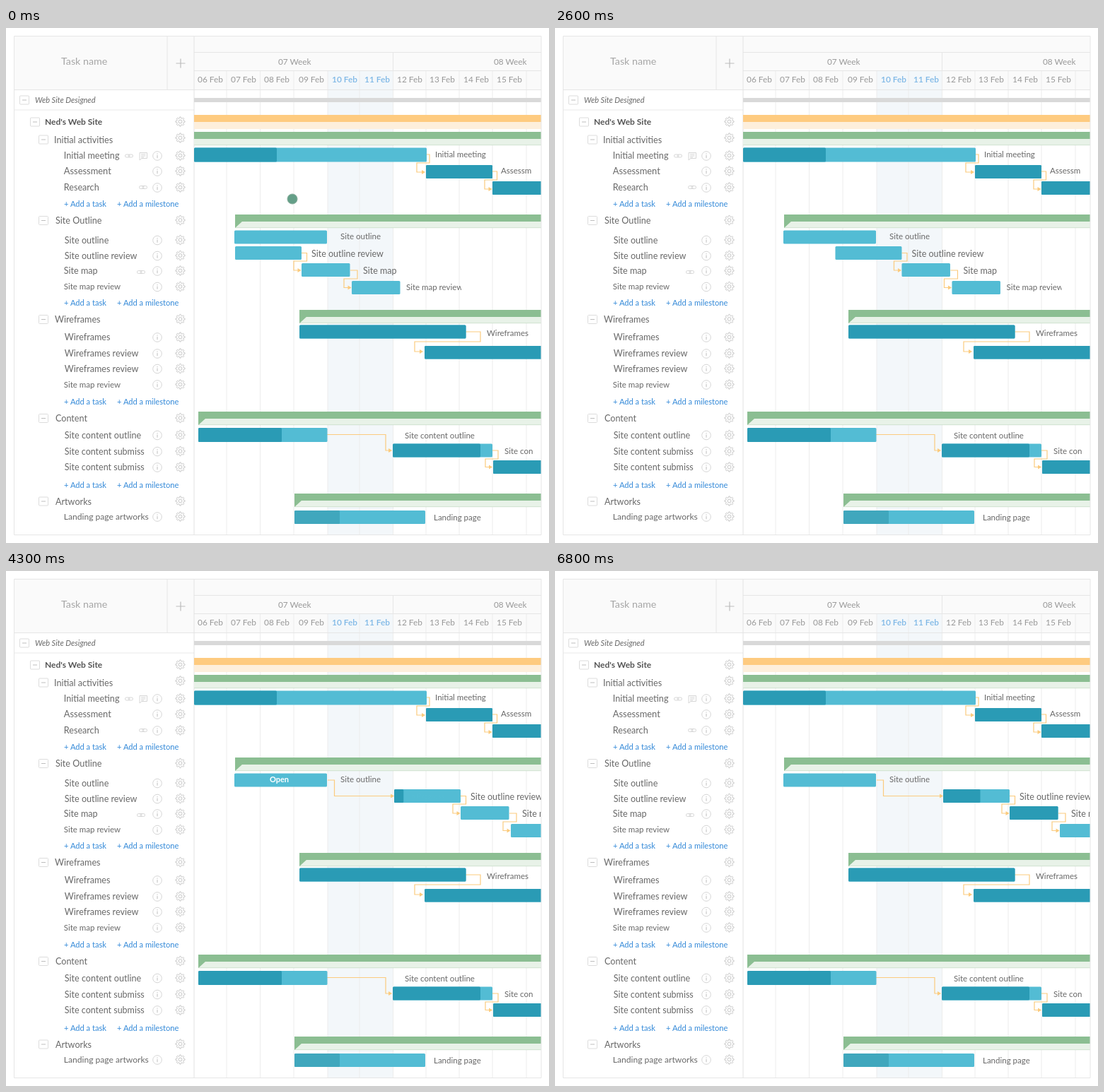
Recreate the animation shown at these times as an HTML page. Size 768 px wide and 729 px high, loop 6.9 s.

```html
<!DOCTYPE html>
<html lang="en">
<head>
<meta charset="utf-8">
<title>Project timeline</title>
<style>
html, body { margin: 0; width: 100%; height: 100%; overflow: hidden; background: #fff; }
svg { display: block; width: 768px; height: 729px; font-family: Lato, "Open Sans", sans-serif; }
</style>
</head>
<body>
<svg id="stage" viewBox="0 0 768 729"></svg>
<script>
const LOOP = 6900;
const LIGHT = '#53bcd4', DARK = '#2a9bb5', LINK = '#fbcb7e', YELLOW = '#ffbf00';
const GREY = '#d6d6d6', RULE = '#e6e6e6', INK = '#686868';
const stage = document.getElementById('stage');

function add(parent, tag, attrs) {
  const el = document.createElementNS('http://www.w3.org/2000/svg', tag);
  for (const key in attrs) el.setAttribute(key, attrs[key]);
  parent.appendChild(el);
  return el;
}
const rect = (p, x, y, width, height, fill, extra) =>
  add(p, 'rect', { x, y, width, height, fill, ...extra });
const path = (p, d, stroke, width = 1, extra) =>
  add(p, 'path', { d, fill: 'none', stroke, 'stroke-width': width, ...extra });
const circle = (p, cx, cy, r, extra) => add(p, 'circle', { cx, cy, r, ...extra });

// y is the optical middle of the line
function text(p, str, x, y, size = 11.5, fill = INK, extra) {
  const el = add(p, 'text', { x, y: y + size * 0.36, 'font-size': size, fill, ...extra });
  el.textContent = str;
  return el;
}

function bar(p, x, y, end, height, done = 0, dark = DARK) {
  rect(p, x, y, end - x, height, LIGHT, { rx: 1.5 });
  return rect(p, x, y, done, height, dark, { rx: 1.5 });
}

function connector(p, d, tipX, tipY) {
  path(p, d + 'H' + (tipX - 4), LINK, 1.2);
  add(p, 'path', { d: `M${tipX} ${tipY}l-5 -3v6z`, fill: LINK });
}

function summary(p, x, y, corner = true) {
  rect(p, x, y + 10, 760 - x, 9, '#e8f2e8');
  path(p, `M${x} ${y + 18.7}H760`, '#c9dfcb', 0.8);
  rect(p, x, y, 760 - x, 10, '#8bbe92');
  if (corner) add(p, 'path', { d: `M${x} ${y + 9}h11l-11 10z`, fill: '#8bbe92' });
}

function gear(p, x, y) {
  let d = '';
  for (let i = 0; i < 64; i++) {
    const a = i / 64 * Math.PI * 2;
    const r = 5.7 + 0.95 * Math.max(-1, Math.min(1, 2 * Math.cos(8 * a)));
    d += `${i ? 'L' : 'M'}${(x + r * Math.cos(a)).toFixed(2)} ${(y + r * Math.sin(a)).toFixed(2)}`;
  }
  path(p, d + 'z', '#c6c6c6');
  circle(p, x, y, 2.4, { fill: 'none', stroke: '#c6c6c6' });
}

function info(p, x, y) {
  circle(p, x, y, 6.3, { fill: 'none', stroke: GREY });
  path(p, `M${x} ${y - 1}v4.2M${x} ${y - 3.6}v1.4`, '#c4c4c4', 1.1);
}

function chain(p, x, y) {
  rect(p, x - 5.5, y - 2, 6.5, 4, 'none', { rx: 2, stroke: GREY });
  rect(p, x - 1, y - 2, 6.5, 4, 'none', { rx: 2, stroke: GREY });
}

function note(p, x, y) {
  path(p, `M${x - 5} ${y - 4.5}h10.5v8h-7.5l-3 2.5zM${x - 3} ${y - 2.2}h6.5M${x - 3} ${y}h6.5M${x - 3} ${y + 2}h4`, GREY);
}

function toggle(p, x, y) {
  rect(p, x - 6.5, y - 6, 13, 12, '#fff', { rx: 1, stroke: '#dcdcdc' });
  path(p, `M${x - 3} ${y}h6`, '#bdbdbd');
}

// Header and grid
rect(stage, 11, 11, 746, 76, '#fafafa');
rect(stage, 455, 60, 93, 657, '#f3f7fa');
const days = [312, 359.5, 407, 455, 500, 547.5, 594, 641, 688, 736];
days.forEach(x => path(stage, `M${x} 60V717`, '#ececec'));
path(stage, 'M266 34.5H757M266 60.5H757M11 87.5H757M228 11V87M547.5 34V60', RULE);
path(stage, 'M11 116H266', '#e9e9e9');
path(stage, 'M266 11V717', '#e2e2e2');

text(stage, 'Task name', 78, 46.7, 14.3, '#a6a6a6');
path(stage, 'M240.5 50h13M247 43.5v13', '#bcbcbc', 1.2);
text(stage, '07 Week', 385, 47.5, 11.8, '#999');
text(stage, '08 Week', 690, 47.5, 11.8, '#999');
[271, 318, 365, 414, 461, 507, 553, 599, 647, 694].forEach((x, i) => {
  const weekend = i === 4 || i === 5;
  text(stage, String(i + 6).padStart(2, '0') + ' Feb', x, 73, 11.9, weekend ? '#7db7e6' : '#999',
    { 'font-weight': weekend ? 600 : 400 });
});

// Task tree
toggle(stage, 26, 102);
text(stage, 'Web Site Designed', 41, 102, 11, INK, { 'font-style': 'italic' });
toggle(stage, 41, 133);
text(stage, "Ned's Web Site", 55, 133, 12, '#555', { 'font-weight': 700 });
gear(stage, 246.5, 132.5);

const sections = [
  ['Initial activities', 68, 158], ['Site Outline', 70, 272.5], ['Wireframes', 69, 412.5],
  ['Content', 70, 552.5], ['Artworks', 70, 670]
];
sections.forEach(([name, x, y], i) => {
  toggle(stage, 53, y);
  text(stage, name, x, y, 12.6);
  gear(stage, 246.5, i ? y - 0.5 : 155.5);
});

const tasks = [
  ['Initial meeting', 180.5], ['Assessment', 202.5, 12.9], ['Research', 225.5],
  ['Site outline', 300], ['Site outline review', 322], ['Site map', 343.5], ['Site map review', 366, 11.5],
  ['Wireframes', 437.5], ['Wireframes review', 460.5], ['Wireframes review', 482], ['Site map review', 504.5, 11.5],
  ['Site content outline', 576], ['Site content submiss', 599, 12.5], ['Site content submiss', 621.5, 12.5],
  ['Landing page artworks', 691.5, 12.1]
];
tasks.forEach(([name, y, size = 12.6]) => {
  const indent = /^(Site [oc]|Wire)/.test(name) ? 82.8 : 81.8;
  text(stage, name, indent, y, size);
  info(stage, 214, y + 0.5);
  gear(stage, 246.5, y);
});
chain(stage, 174, 181);
note(stage, 194, 181);
chain(stage, 194, 225.5);
chain(stage, 191, 345.5);
[249, 389, 529, 647].forEach(y => {
  text(stage, '+ Add a task', 82, y, 11.1, '#3389d8');
  text(stage, '+ Add a milestone', 157, y, 11.1, '#3389d8');
});

// Chart
const defs = add(stage, 'defs', {});
rect(add(defs, 'clipPath', { id: 'chartClip' }), 266, 0, 491, 729, '#000');
rect(add(defs, 'clipPath', { id: 'labelClip' }), 560, 355, 84, 24, '#000');
const chart = add(stage, 'g', { 'clip-path': 'url(#chartClip)' });

rect(chart, 266, 99, 494, 6, '#d9d9d9');
rect(chart, 266, 133, 494, 10, '#fdefdc');
rect(chart, 266, 123, 494, 10, '#fecb80');
summary(chart, 266, 147, false);
summary(chart, 324, 264);
summary(chart, 415, 399);
summary(chart, 272, 543);
summary(chart, 408, 659);

connector(chart, 'M595 179H599V191H581V204', 593, 204);
connector(chart, 'M688 203H694.5V215H677V228', 687.5, 228);
connector(chart, 'M650 430H671V444H578V458', 590, 458);
connector(chart, 'M454 575.5H537V598', 546, 598);
connector(chart, 'M688 598H696V610H678V621.5', 688, 621.5);

bar(chart, 266, 169.5, 595, 20, 117);
bar(chart, 594, 194, 688, 19, 94);
bar(chart, 688, 217, 760, 19, 72);
bar(chart, 323, 286.5, 454, 19);
bar(chart, 415, 420.5, 650.5, 19, 235.5);
bar(chart, 592, 450, 760, 18.5, 168);
bar(chart, 272, 566, 454.5, 20, 118);
bar(chart, 547, 588.5, 688, 19, 124);
bar(chart, 689, 612, 760, 19, 71);
bar(chart, 408, 683, 593, 19, 64, '#40a7bd');

[['Initial meeting', 607, 178.5], ['Assessm', 700, 202], ['Site outline', 473, 295],
 ['Wireframes', 680, 431.5], ['Site content outline', 564, 576.5], ['Site con', 705, 599],
 ['Landing page', 605, 693]].forEach(([name, x, y]) => text(chart, name, x, y));

// Dependent tasks that slide together
const join = add(chart, 'g', {});
connector(join, 'M455 296H464.5V318.5', 549, 318.5);
const chainGroup = add(chart, 'g', {});
connector(chainGroup, 'M418 318.5H425.5V330H407V343', 417.5, 343);
connector(chainGroup, 'M487 343H497V355H478V367.5', 488.5, 367.5);
const reviewDone = bar(chainGroup, 324, 309, 418, 19);
const mapDone = bar(chainGroup, 418, 333, 486.5, 19);
bar(chainGroup, 489, 358, 557.5, 19);
text(chainGroup, 'Site outline review', 432, 319.5, 12.5);
text(chainGroup, 'Site map', 505, 343, 12.5);
text(add(chainGroup, 'g', { 'clip-path': 'url(#labelClip)' }), 'Site map review', 566, 366.5);

const status = { 'text-anchor': 'middle', 'font-weight': 700 };
const openLabel = text(chart, 'Open', 386.5, 295, 11, '#fff', status);
const progressLabel = text(chart, 'In Progress', 595, 318, 10, '#fff', status);

// Pointer and link being drawn
const thread = path(stage, '', YELLOW, 1.5);
const target = circle(stage, 313.5, 318, 4.5, { fill: YELLOW });
const handle = circle(stage, 0, 0, 7.8, { fill: YELLOW });
const pointer = circle(stage, 0, 0, 7, { fill: '#649f88', stroke: '#84ab98' });

const ramp = (t, from, to) => Math.max(0, Math.min(1, (t - from) / (to - from)));
const mix = (a, b, k) => a + (b - a) * k;
const show = (el, amount) => el.setAttribute('opacity', +amount);
function place(el, x, y) {
  el.setAttribute('cx', x);
  el.setAttribute('cy', y);
}

function draw(t) {
  const approach = ramp(t, 50, 700);
  place(pointer, mix(405, 454, approach), mix(242, 296, approach));
  show(pointer, t < 720);

  const drag = ramp(t, 715, 2185);
  const x = mix(454, 313.5, drag);
  const y = mix(296, 318, drag) - 0.3 * Math.sin(Math.PI * drag);
  const dragging = t >= 720 && t < 2250;
  place(handle, x, y);
  show(handle, dragging);
  show(target, dragging);
  thread.setAttribute('d', `M454 296L${x} ${y}`);
  thread.setAttribute('stroke-dasharray', t < 1200 ? 'none' : '3 2');
  show(thread, dragging ? mix(1, 0.25, ramp(t, 1000, 1900)) : 0);

  chainGroup.setAttribute('transform', `translate(${225 * ramp(t, 2250, 3340)} 0)`);
  show(join, t >= 3400);

  reviewDone.setAttribute('width', 52.5 * ramp(t, 4200, 4600));
  mapDone.setAttribute('width', 68.5 * ramp(t, 4700, 5100));
  const fade = 1 - ramp(t, 6200, 6500);
  show(openLabel, ramp(t, 3800, 4000) * fade);
  show(progressLabel, ramp(t, 4300, 4500) * fade);
}

const start = performance.now();
function tick() {
  draw((performance.now() - start) % LOOP);
  requestAnimationFrame(tick);
}
tick();

path(stage, 'M11.5 11.5H757V717.5H11.5z', RULE);
</script>
</body>
</html>
```
